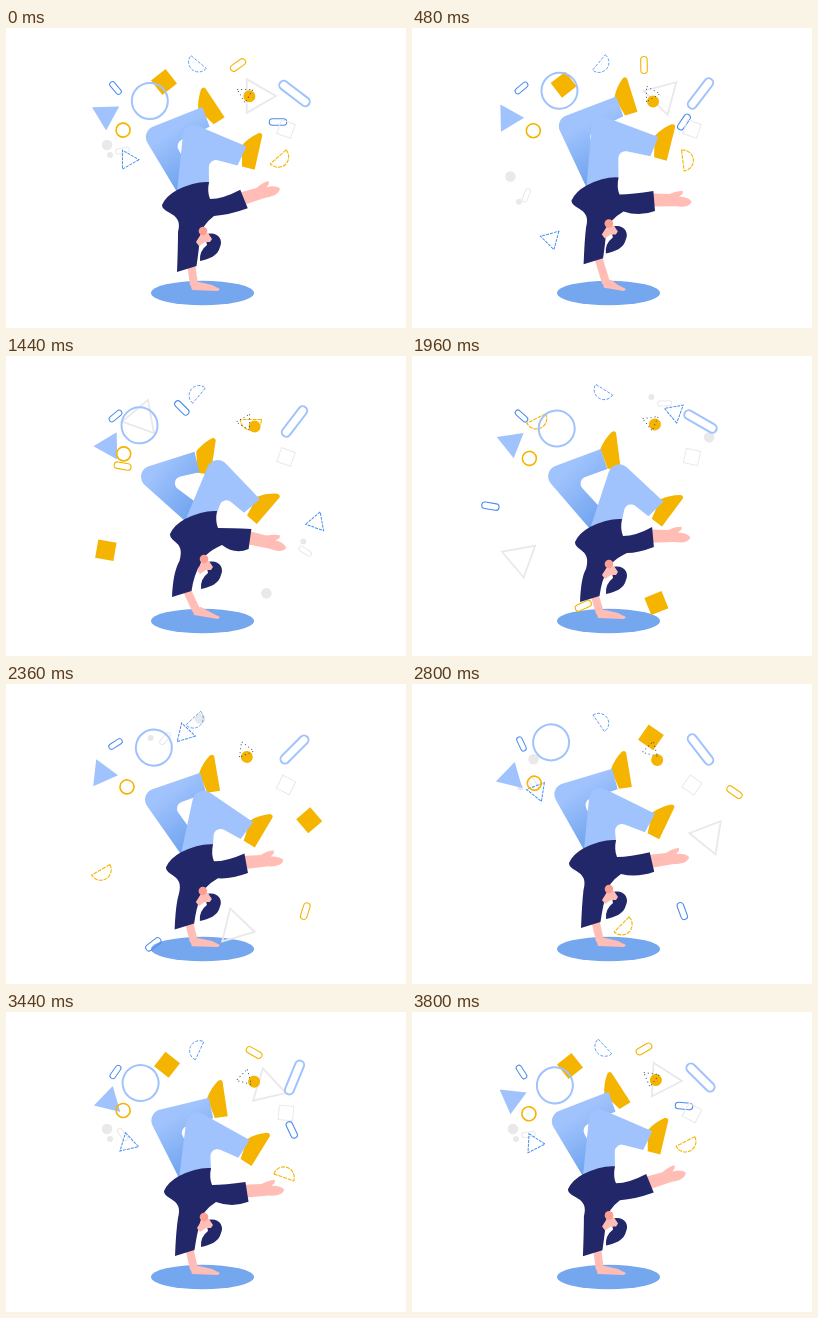
Write an HTML page with a canvas that moves like this. It is 400 px wide and 300 px high and loops after 3.84 s.

```html
<!DOCTYPE html>
<html lang="en">
<head>
<meta charset="utf-8">
<title>Handstand</title>
<style>
  html, body { margin: 0; width: 100%; height: 100%; overflow: hidden; background: #fff; }
  canvas { display: block; }
</style>
</head>
<body>
<canvas id="stage" width="400" height="300"></canvas>
<script>
const ctx = document.getElementById('stage').getContext('2d');
const LOOP = 3840, SPIN = 1920, TRAVEL = 3080, ORBIT = 108;
const RAD = Math.PI / 180;
const SKY = '#a0c3fd', BLUE = '#4a8df0', GOLD = '#f4b400', NAVY = '#22276a',
      SKIN = '#ffbdb5', EAR = '#fb9f93', GRAY = '#e9e9ec';

// ---- timing ----
const KEYS = [0, 920, 1440, 1960, 2800, 3440];
const COUNT = KEYS.length;
const lap = i => Math.floor(i / COUNT);
const wrap = i => i - lap(i) * COUNT;
const keyTime = i => KEYS[wrap(i)] + lap(i) * LOOP;

// Smooth looping curve through the key values; `gain` is added per loop.
function track(values, t, gain = 0) {
  const value = i => values[wrap(i)] + lap(i) * gain;
  const slope = i => (value(i + 1) - value(i - 1)) / (keyTime(i + 1) - keyTime(i - 1));
  let i = COUNT - 1;
  while (t < KEYS[i]) i--;
  const span = keyTime(i + 1) - keyTime(i), u = (t - keyTime(i)) / span, v = 1 - u;
  return value(i) * v * v * (1 + 2 * u) + value(i + 1) * u * u * (3 - 2 * u)
    + span * u * v * (slope(i) * v - slope(i + 1) * u);
}
const trackPoint = (xs, ys, t) => [track(xs, t), track(ys, t)];

// ---- drawing helpers ----
function fill(color) { ctx.fillStyle = color; ctx.fill(); }

function stroke(color, width = 1, dash = []) {
  ctx.strokeStyle = color;
  ctx.lineWidth = width;
  ctx.setLineDash(dash);
  ctx.stroke();
}

function placed(x, y, degrees, draw) {
  ctx.save();
  ctx.translate(x, y);
  ctx.rotate(degrees * RAD);
  draw();
  ctx.restore();
}

function polygon(points) {
  ctx.beginPath();
  points.forEach(p => ctx.lineTo(...p));
  ctx.closePath();
}

function disc(r, x = 0, y = 0) {
  ctx.beginPath();
  ctx.arc(x, y, r, 0, 7);
}

function triangle(r, x = 0, y = 0, turn = 0) {
  polygon([0, 120, 240].map(a => [x + r * Math.cos((a + turn) * RAD), y + r * Math.sin((a + turn) * RAD)]));
}

function pill(w, h) {
  ctx.beginPath();
  ctx.roundRect(-w / 2, -h / 2, w, h, h / 2);
}

function halfDisc(r) {
  ctx.beginPath();
  ctx.arc(-r * .4, 0, r, -Math.PI / 2, Math.PI / 2);
  ctx.closePath();
}

const square = s => { ctx.beginPath(); ctx.rect(-s / 2, -s / 2, s, s); };

// ---- floating shapes ----
// Shapes that spin in place: x, y, start angle, drawing.
const spinners = [
  [140.5, 66, 0, () => { disc(18, 3.3, 7); stroke(SKY, 2); }],
  [99.8, 90, 0, () => { triangle(15.7, 0, -3.3, 89); fill(SKY); }],
  [119.5, 100.3, 0, () => { disc(7, -2.4, 1.8); stroke(GOLD, 1.6); }],
  [288.5, 65.5, 37.5, () => { pill(36, 9); stroke(SKY, 2); }],
  [280, 101, 20, () => { square(14.5); stroke(GRAY); }],
  [244.8, 72, 0, () => { disc(6, -1.4, -3.8); fill(GOLD); }],
  [109.5, 60, 50, () => { pill(15, 5.5); stroke(BLUE); }],
  [190, 37, 130, () => { halfDisc(10); stroke(BLUE, .8, [3, 1.5]); }],
  [239, 66, 210, () => { triangle(9); stroke('#3a4a78', 1, [1, 3]); }]
];

const triangleTurn = [[0, -96, -190, -280, -411, -463], -480];
const pillTurn = [[0, -100, -135, -170, -290, -475], -540];

// Shapes that also make one lap around the figure.
const travellers = [
  { home: [101, 117], hub: [208, 142.6], start: 160, draw: () => { disc(5.3); fill(GRAY); } },
  { home: [104, 127], hub: [200, 139], start: 0, draw: () => { disc(3); fill(GRAY); } },
  { home: [158, 54], hub: [197, 150], start: 400, turn: [[52, 45, 10, -22, -55, -52], -90],
    draw: () => { square(18.5); fill(GOLD); } },
  { home: [250.5, 68], hub: [197.5, 142], start: 530, turn: triangleTurn,
    draw: () => { triangle(19.5); stroke(GRAY, 1.8); } },
  { home: [232, 37], hub: [219.5, 153], start: 530, tilt: -35, turn: pillTurn,
    draw: () => { pill(17, 6.5); stroke(GOLD, 1.1); } },
  { home: [272, 94], hub: [186, 159.5], start: 650, turn: pillTurn,
    draw: () => { pill(17.5, 6.5); stroke(BLUE, 1.1); } },
  { home: [116.5, 122.5], hub: [206, 141], start: 0, tilt: -12, turn: pillTurn,
    draw: () => { pill(14, 5); stroke(GRAY); } },
  { home: [122, 131.5], hub: [205, 143], start: 0, time: 2950, ease: .1, turn: triangleTurn,
    draw: () => { triangle(11); stroke(BLUE, 1, [3, 1]); } },
  { home: [275, 132], hub: [195, 145], start: 740, turn: [[49, -52, -270, -297, -315, -430], -720],
    draw: () => { halfDisc(10.5); stroke(GOLD, 1.1, [4, 1]); } }
];

function drawTraveller({ home, hub, start, time = TRAVEL, ease = .6, tilt = 0, turn, draw }, t) {
  const u = Math.min(1, Math.max(0, (t - start) / time));
  const p = u - ease * Math.sin(2 * Math.PI * u) / (2 * Math.PI);
  const dx = home[0] - hub[0], dy = home[1] - hub[1], near = Math.hypot(dx, dy);
  const r = near + (ORBIT - near) * Math.sin(Math.PI * p);
  const angle = Math.atan2(dy, dx) - 2 * Math.PI * p;
  const degrees = tilt + (turn ? track(turn[0], t, turn[1]) : 0);
  placed(hub[0] + r * Math.cos(angle), hub[1] + r * Math.sin(angle), degrees, draw);
}

// ---- figure ----
const pose = {
  waist:     [[203, 210, 211, 210, 204, 205], [154, 147, 155, 163, 156, 156]],
  backKnee:  [[148, 160, 138, 142, 150, 153], [108, 92, 119, 119, 109, 107]],
  backAnkle: [[200, 212, 191, 192, 203, 205], [89, 75, 106, 103, 95, 96]],
  knee:      [[186, 194, 211, 206, 186, 189], [104, 92, 109, 113, 110, 106]],
  ankle:     [[236, 248, 246, 244, 238, 238], [128, 117, 150, 153, 139, 137]],
  sleeve:    [[238, 246, 244, 241, 240, 241], [171, 177, 183, 181, 178, 180]],
  cuff:      [[181, 181, 176, 178, 179, 179], [241, 228, 238, 243, 241, 241]],
  ear:       [[197, 197, 198, 197, 197, 198], [203, 191, 203, 208, 205, 205]],
  wrist:     [[188, 198, 190, 188, 188, 188], [257, 253, 254, 257, 257, 257]]
};
const backToe = [-95, -60, -53, -69, -71, -70];
const toe = [-49, -40, -21, -25, -36, -30];
const reach = [-9, 25, 21, 8, 0, 4];

const unit = (a, b) => {
  const d = Math.hypot(b[0] - a[0], b[1] - a[1]);
  return [(b[0] - a[0]) / d, (b[1] - a[1]) / d];
};

function leg(hipLeft, hipRight, knee, ankle, inner, color) {
  const up = unit(knee, [(hipLeft[0] + hipRight[0]) / 2, (hipLeft[1] + hipRight[1]) / 2]);
  const out = unit(knee, ankle);
  const fold = unit([0, 0], [up[0] + out[0], up[1] + out[1]]);
  const bend = d => [knee[0] + fold[0] * d, knee[1] + fold[1] * d];
  const side = s => [ankle[0] - out[1] * s, ankle[1] + out[0] * s];
  ctx.beginPath();
  ctx.moveTo(...hipLeft);
  ctx.arcTo(...bend(-14), ...side(-10.5), 11);
  ctx.lineTo(...side(-10.5));
  ctx.lineTo(...side(10.5));
  ctx.arcTo(...bend(inner), ...hipRight, 7);
  ctx.lineTo(...hipRight);
  ctx.closePath();
  fill(color);
}

function shoe([x, y], degrees) {
  placed(x, y, degrees, () => {
    ctx.beginPath();
    ctx.moveTo(8, -7);
    ctx.quadraticCurveTo(18, -7, 28, -2.5);
    ctx.quadraticCurveTo(31, 0, 28.5, 2);
    ctx.lineTo(-2, 18.5);
    ctx.lineTo(-8, 7);
    fill(GOLD);
  });
}

function torso([wx, wy], [sx, sy], [cx, cy], degrees) {
  const nx = -Math.sin(degrees * RAD) * 10, ny = Math.cos(degrees * RAD) * 10;
  const chest = (wx + cx) / 2 - 20;
  ctx.beginPath();
  ctx.moveTo(wx, wy);
  ctx.quadraticCurveTo(wx - 2, wy + 10, wx + 1, wy + 17);
  ctx.quadraticCurveTo(wx + 14, wy + 17, sx - nx, sy - ny);
  ctx.lineTo(sx + nx, sy + ny);
  ctx.quadraticCurveTo(sx - 15, sy + 16, wx + 5, wy + 34);
  ctx.quadraticCurveTo(196, wy + 43, 194, wy + 55);
  ctx.quadraticCurveTo(cx + 12, cy - 20, cx + 9.5, cy - 3);
  ctx.lineTo(cx - 10, cy + 3);
  ctx.quadraticCurveTo(cx - 9, cy - 22, chest, wy + 50);
  ctx.bezierCurveTo(chest + 6, wy + 30, wx - 47, wy + 32, wx - 47, wy + 23);
  ctx.quadraticCurveTo(wx - 43, wy + 14, wx - 32, wy + 8);
  ctx.quadraticCurveTo(wx - 14, wy - 1, wx, wy);
  fill(NAVY);
}

function head() {
  ctx.beginPath();
  ctx.moveTo(2, 4);
  ctx.bezierCurveTo(13, -1, 21, 8, 17, 16);
  ctx.bezierCurveTo(15, 25, 6, 28, -3, 30);
  ctx.quadraticCurveTo(-4, 20, 4, 14);
  fill(NAVY);
  polygon([[-7, 11], [-2, 3], [5, 2], [9, 8], [7, 11], [2, 11], [-4, 15]]);
  fill(SKIN);
  disc(4.3);
  fill(EAR);
}

function figure(t) {
  const at = {};
  for (const part in pose) at[part] = trackPoint(...pose[part], t);
  const { waist, backKnee, backAnkle, knee, ankle, sleeve, cuff, ear, wrist } = at;
  const [wx, wy] = waist, [rx, ry] = wrist;
  const hip = [wx - 32, wy + 10], lift = track(reach, t);

  const shade = ctx.createLinearGradient(...backKnee, wx - 24, wy);
  shade.addColorStop(.1, SKY);
  shade.addColorStop(1, '#72a5ef');
  shoe(backAnkle, track(backToe, t));
  leg(hip, [wx - 15, wy - 4], backKnee, backAnkle, 22, shade);
  shoe(ankle, track(toe, t));
  leg(hip, [wx, wy + 2], knee, ankle, 31, SKY);

  ctx.beginPath();
  ctx.moveTo(cuff[0] + 4, cuff[1] - 6);
  ctx.lineTo(rx, ry);
  stroke(SKIN, 8);
  polygon([[rx - 4, ry - 2], [rx - 2, ry + 5], [212, 263], [214, 261], [206, 257], [rx + 5, ry - 3]]);
  fill(SKIN);

  placed(...sleeve, lift, () => {
    ctx.beginPath();
    ctx.moveTo(-4, -7);
    ctx.lineTo(14, -9);
    ctx.quadraticCurveTo(22, -14, 27, -14);
    ctx.lineTo(27, -11);
    ctx.lineTo(24, -8);
    ctx.quadraticCurveTo(33, -9, 37, -5);
    ctx.quadraticCurveTo(36, 2, 22, 2);
    ctx.lineTo(-2, 6);
    fill(SKIN);
  });
  torso(waist, sleeve, cuff, lift - 13);
  placed(...ear, 0, head);
}

// ---- loop ----
function render(now) {
  const t = now % LOOP;
  ctx.fillStyle = '#fff';
  ctx.fillRect(0, 0, 400, 300);
  ctx.beginPath();
  ctx.ellipse(196.5, 265, 51.5, 12.3, 0, 0, 7);
  fill('#75a7ef');
  travellers.forEach(item => drawTraveller(item, t));
  spinners.forEach(([x, y, angle, draw]) => placed(x, y, angle - 360 * t / SPIN, draw));
  figure(t);
}

const began = performance.now();
function tick() {
  render(performance.now() - began);
  requestAnimationFrame(tick);
}
tick();
</script>
</body>
</html>
```
